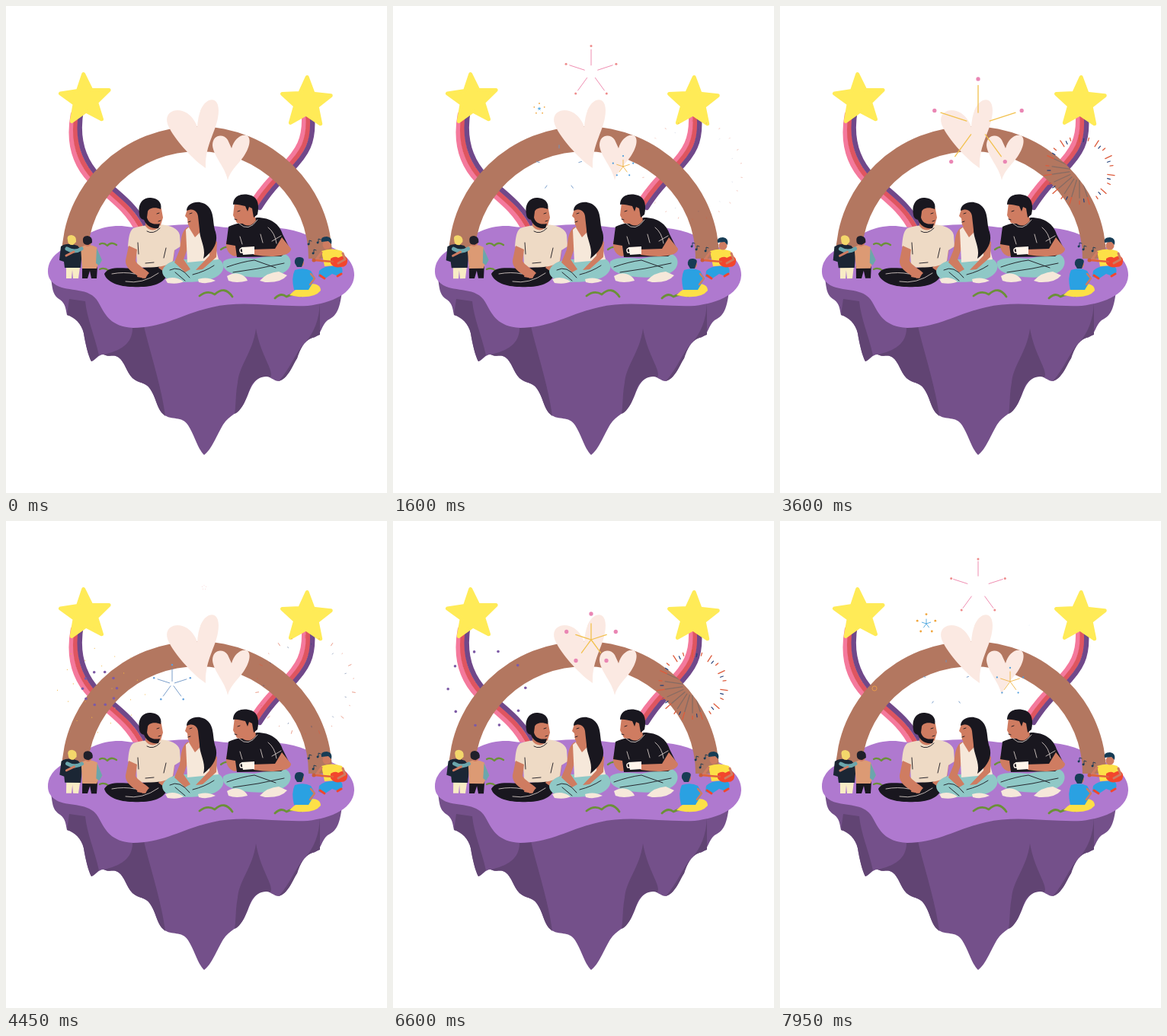
Recreate the animation shown at these times as an HTML page. Size 500 px wide and 640 px high, loop 8 s.

```html
<!DOCTYPE html>
<html lang="en">
<head>
<meta charset="utf-8">
<title>Floating island</title>
<style>
html, body { margin: 0; width: 100%; height: 100%; overflow: hidden; background: #fff; }
svg { display: block; width: 100vw; height: 100vh; }
</style>
</head>
<body>
<svg id="stage" viewBox="0 0 500 640" xmlns="http://www.w3.org/2000/svg"></svg>
<script>
const LOOP = 8000, STEP = 50;
const C = {
  lilac: '#af79cf', body: '#74508a', shade: '#614473', arch: '#b37760', blush: '#fbe9e2',
  star: '#ffeb57', skin: '#cf7c61', black: '#19171f', cream: '#eedac5', pale: '#f6e8da',
  teal: '#8fc8c6', green: '#6b9038', navy: '#173c55', blue: '#2aa1e2', yellow: '#fde047', red: '#f2462d'
};

const fill = (d, color) => `<path d="${d}" fill="${color}"/>`;
const line = (d, color, w = 1) =>
  `<path d="${d}" fill="none" stroke="${color}" stroke-width="${w}" stroke-linecap="round" stroke-linejoin="round"/>`;
const dot = (x, y, r, color) =>
  `<circle cx="${x.toFixed(1)}" cy="${y.toFixed(1)}" r="${r.toFixed(2)}" fill="${color}"/>`;
const group = (inner, attrs = '') => `<g ${attrs}>${inner}</g>`;
const clamp = v => Math.max(0, Math.min(1, v));
const mod = (a, n) => ((a % n) + n) % n;

const ARCH = 'M73 330A177.500 173 0 0 1 428 332L397 332A144.500 139.500 0 0 0 107 330Z';

function tube(d, dy) {
  return ['#f4799c', '#df5560', '#70488a']
    .map((c, i) => group(line(d, c, 6.4), `transform="translate(${i * 5.5} ${i * dy})"`)).join('');
}

function tubes() {
  return tube('M88 142C82 174 87 205 111 230C138 254 160 268 174 298', -3) +
    tube('M391 142C393 174 384 190 362 212C345 229 334 241 322 260', 2.5);
}

function star(cx, cy, tilt) {
  const points = Array.from({ length: 10 }, (_, i) => {
    const a = (i * 36 - 90 + tilt) * Math.PI / 180, r = i % 2 ? 15 : 33.5;
    return `${(cx + Math.cos(a) * r).toFixed(1)},${(cy + Math.sin(a) * r).toFixed(1)}`;
  });
  return `<polygon points="${points.join(' ')}" fill="${C.star}" stroke="${C.star}" stroke-width="5" stroke-linejoin="round"/>`;
}

function island() {
  return fill('M59 358C61 371 61 378 68 384C78 390 78 396 80 406C90 409 99 417 102 430C104 443 108 460 112 467C118 465 121 458 128 458C137 462 141 457 148 462C156 468 158 481 166 489C174 496 183 494 189 503C197 514 198 530 207 537C217 545 231 538 239 551C248 565 251 581 260 590C270 583 277 563 285 550C293 537 305 536 312 523C319 510 321 496 332 489C344 481 349 493 358 493C370 490 375 473 382 463C386 451 391 440 402 436C414 435 413 420 422 413C437 406 438 393 441 376Z', C.body) +
    fill('M83 385L104 388C106 410 116 432 122 459C118 462 116 466 112 467C108 460 104 443 102 430C99 417 90 409 80 406Z', C.shade) +
    fill('M166 421L181 421C189 455 204 500 209 539L207 537C198 530 197 514 189 503C183 494 174 496 166 489C158 481 156 468 148 462C141 457 137 462 128 458C150 453 167 444 166 421Z', C.shade) +
    fill('M328 424C324 455 306 472 304 495C301 510 302 524 300 536C311 532 317 510 322 498C329 488 340 485 347 488C352 478 335 462 328 424Z', C.shade) +
    fill('M412 390C411 413 404 430 392 443C380 455 374 475 358 493C371 489 376 472 382 463C386 451 391 440 402 436L412 432Z', C.shade) +
    fill('M55 349C55 328 75 318 93 311C105 299 125 288 152 289C180 294 210 287 246 287C278 289 298 294 335 292C366 288 397 299 421 314C445 324 457 337 457 354C456 378 428 390 396 394C355 396 310 386 270 396C236 403 207 423 167 423C137 421 131 407 121 389C110 369 82 376 66 367C58 362 55 356 55 349Z', C.lilac) +
    line('M123 313Q128 310 133 315Q138 309 145 314M282 320Q290 314 296 319Q302 314 308 317M123 346Q129 343 135 348', C.green, 2.2) +
    line('M254 381Q264 373 274 379Q287 367 297 382M353 384Q361 376 368 382Q376 377 387 381', C.green, 2.8);
}

function hearts() {
  return fill('M262 213C246 203 218 172 212 155C207 139 224 132 238 141C245 146 249 153 251 159C252 145 255 130 266 124C277 120 281 131 278 147C275 166 261 184 262 213Z', C.blush) +
    fill('M291 229C288 212 272 197 271 183C271 169 285 167 291 176L296 187C299 176 307 168 316 170C323 174 319 188 311 199C302 211 294 217 291 229Z', C.blush);
}

function leftMan() {
  return fill('M129 352C134 342 150 344 167 345L207 341L213 350C207 367 190 370 166 369C149 369 132 363 129 352Z', C.black) +
    fill('M222 318L219 337L207 349L200 344L211 330L213 315Z', C.skin) +
    fill('M167 292C178 288 188 288 200 287C216 288 226 292 228 301L229 316L221 321L219 335C211 345 182 344 172 343L171 321L160 316C161 304 162 296 167 292Z', C.cream) +
    fill('M161 315L172 320L170 335C173 341 182 345 188 351L180 358C167 352 156 344 157 334Z', C.skin) +
    fill('M183 279L200 284L201 290C195 297 187 295 183 289Z', C.skin) +
    fill('M178 268C180 259 203 259 204 267L206 278L203 288C197 293 188 291 182 283Z', C.skin) +
    fill('M175 274C172 259 181 251 190 252C201 253 205 260 203 267C196 264 188 265 186 270L185 278C187 285 193 288 202 286L200 292C191 294 183 287 181 281C177 280 175 277 175 274Z', C.black) +
    line('M198 273L201 272M200 283L203 282M173 311L174 326M210 318L207 331M183 338L194 337M185 296Q193 301 202 292', C.black, .9) +
    line('M139 352Q155 349 169 352M157 362Q179 366 200 351', '#e8dcd6', .8) +
    fill('M174 347L187 351L183 358L172 356Z', C.skin);
}

function woman() {
  return fill('M205 348C210 335 225 333 239 333L276 331C286 335 288 344 282 351C272 362 252 363 231 363C214 362 205 357 205 348Z', C.teal) +
    fill('M209 359Q221 354 233 362Q226 366 212 364ZM252 359Q264 355 275 361Q264 366 253 363Z', C.pale) +
    fill('M239 290C229 296 230 309 228 320L221 337L235 350L242 346L233 333L241 310Z', C.skin) +
    fill('M236 294L242 289L257 294L272 306L279 333L238 337Z', C.pale) +
    fill('M268 305L277 310L276 330L258 346L249 347L267 328Z', C.skin) +
    fill('M242 282L254 280L257 295L248 304L240 291Z', C.skin) +
    fill('M239 264L235 276L238 279L239 288C244 292 252 288 254 278L252 264Z', C.skin) +
    fill('M237 269C237 259 251 255 261 260C275 269 270 283 275 297C279 311 272 322 259 332C263 317 254 307 254 294L252 276C251 269 245 265 237 269Z', C.black) +
    line('M241 273L244 272M239 284L242 283M215 347Q228 340 241 357M245 353Q261 349 273 341M222 350L235 361', C.black, .9);
}

function rightMan() {
  return fill('M285 336C292 329 310 331 326 332L363 325C375 328 376 339 370 346C361 356 337 359 311 355C294 352 283 347 285 336Z', C.teal) +
    fill('M290 355C302 347 315 354 317 361Q302 365 292 361ZM333 361Q343 350 358 349L369 354Q361 364 340 363Z', C.pale) +
    fill('M289 309L301 313L302 321L312 318L313 325L300 329C291 326 288 318 289 309Z', C.skin) +
    fill('M292 290C303 285 317 284 329 278C348 278 359 287 363 300L373 320L361 329L303 330L301 315L289 313Z', C.black) +
    fill('M362 304L374 319C374 329 351 331 325 327L323 320L353 319Z', C.skin) +
    fill('M308 277L326 273L328 282Q319 294 308 284Z', C.skin) +
    fill('M300 258L298 275L303 285C311 288 322 284 328 275L326 257Z', C.skin) +
    fill('M298 261C298 250 308 246 318 248C330 250 333 260 330 274L325 278L323 266L319 264L317 270L314 263C308 262 303 260 298 261Z', C.black) +
    line('M304 270L307 269M300 280L303 281M290 343Q310 336 326 334L354 344M298 350L331 345L365 338', C.black, .9) +
    line('M306 286Q318 298 330 281M344 291Q353 298 355 312M307 303L310 313M334 300L337 311M349 309L361 302', '#eadfd8', .8) +
    fill('M309 317L326 316L326 326L311 327Z', '#fff5eb') + line('M310 318Q305 319 308 324L312 324', '#fff5eb', 1.5);
}

function couple() {
  return fill('M79 343L97 343L95 358L88 358L87 347L86 358L79 358Z', '#f8ecc5') +
    fill('M100 342L120 342L119 358L112 358L110 348L107 358L100 358Z', C.black) +
    fill('M72 316Q80 310 94 315L100 322L98 344L77 344L76 336L70 334Z', '#1b2634') +
    fill('M98 317Q108 311 119 317L126 335L121 339L119 345L100 345Z', '#dc9a74') +
    fill('M119 318L126 334L122 341L118 338Z', '#6ba6ac') +
    line('M80 319Q90 325 99 319', '#6ba6ac', 5) + line('M79 328L89 323', C.skin, 3) +
    dot(86, 309, 5, C.skin) + dot(107, 311, 5, C.skin) +
    fill('M81 308Q79 301 86 301Q93 302 92 310L88 314Q81 314 81 308Z', '#f3d76b') +
    fill('M101 309Q100 302 107 302Q114 303 113 311L108 314Q101 314 101 309Z', '#20202a');
}

function guitarist(lean) {
  const body = fill('M414 322Q428 317 441 322L445 340L418 342Z', C.yellow) +
    line('M414 324L408 332L415 335', C.skin, 3) +
    fill('M426 332Q432 328 436 331Q445 325 448 333Q449 343 439 343Q430 345 426 338Z', C.red) +
    line('M429 336L404 334', '#e0623d', 2.5) + dot(404, 334, 2.5, '#c95d39') +
    line('M442 325L445 333L436 338', C.skin, 3);
  const head = dot(421, 314, 5.5, C.skin) +
    fill('M414 310Q412 303 421 303Q429 304 427 313L423 309Z', C.navy);
  return fill('M411 348Q420 339 440 343Q445 350 436 355L428 352L419 358L410 356Z', C.blue) +
    line('M412 354L418 358M435 355L440 352', C.red, 3) +
    group(body, `transform="translate(${lean * 2} 0)"`) +
    group(head, `transform="translate(${lean * 12} ${lean})"`);
}

function friend(lean) {
  return fill('M372 380Q383 368 400 365Q413 365 413 374Q405 384 383 382Z', C.yellow) +
    group(fill('M379 347Q391 343 400 348L406 358L397 373L378 373Q374 357 379 347Z', C.blue) +
      line('M400 352L405 358L399 366', C.skin, 2.5), `transform="translate(${lean * 3} 0)"`) +
    group(dot(386, 338, 5, C.skin) + fill('M379 338Q378 329 386 330Q393 331 390 337L388 343L382 343Z', C.navy),
      `transform="translate(${lean * 8} ${lean * 2})"`);
}

function notes(t, lean) {
  const bob = Math.round(Math.sin(t / 160) * 1.5);
  const spots = lean ? [[392, 315], [398, 321], [410, 321]] : [[397, 313], [403, 325], [409, 311]];
  return spots.map(([x, y], i) => {
    const h = y + (i % 2 ? bob : -bob);
    return dot(x, h, 1.4, C.navy) + line(`M${x + 1} ${h}V${h - 5}L${x + 4} ${h - 4}`, C.navy, .9);
  }).join('');
}

function spoke(cx, cy, angle, from, to, color, w) {
  const x = Math.cos(angle), y = Math.sin(angle);
  return line(`M${(cx + x * from).toFixed(1)} ${(cy + y * from).toFixed(1)}L${(cx + x * to).toFixed(1)} ${(cy + y * to).toFixed(1)}`, color, w);
}

// Five-pointed sparks: centre, first start, reach, ray colour, tip colour
const SPARKS = [
  [260, 156, 100, 66, '#f2c14e', '#ea86b4'],
  [260, 87, 1250, 38, '#ee7fa8', '#ee8c8c'],
  [327, 137, 1625, 38, '#e97da2', '#4a9bdc'],
  [192, 135, 1500, 35, '#4fa8df', '#f0a53c'],
  [302, 211, 1400, 27, '#f0b445', '#4a9bdc'],
  [218, 214, 1000, 31, '#6b93c4', '#5f9fdc']
];
const SPARK_PERIOD = 3150;

function spark(t, [cx, cy, start, reach, ray, tip]) {
  const p = mod(t - start, SPARK_PERIOD);
  if (p > 800) return '';
  const front = q => reach * Math.sin(clamp(q / 450) * Math.PI / 2) ** 1.5;
  const head = front(p), outer = front(p - 60), inner = front(p - 230) * .93;
  const size = Math.min(head / 8, reach / 25) * (1 - clamp((p - 400) / 280));
  const w = reach > 50 ? 1.3 : .9;
  let out = '';
  for (let i = 0; i < 5; i++) {
    const a = -Math.PI / 2 + i * Math.PI * 2 / 5;
    if (outer > inner) out += spoke(cx, cy, a, inner, outer, ray, w);
    if (size > 0) out += dot(cx + Math.cos(a) * head, cy + Math.sin(a) * head, size, tip);
  }
  return out;
}

// Orange sprinkle followed by a violet ring
function sprinkle(t) {
  const p = mod(t + 20, 1980), cx = 123, cy = 220;
  let out = '';
  if (p > 25 && p < 150) {
    out += `<circle cx="${cx + 1}" cy="${cy}" r="${(p / 16).toFixed(1)}" fill="none" stroke="#e89a4a" stroke-width="1"/>`;
  }
  if (p >= 120 && p < 600) {
    const grow = 1 - (1 - clamp((p - 80) / 380)) ** 2;
    const size = 1.1 * (1 - clamp((p - 430) / 170));
    for (let i = 0; i < 22; i++) {
      const a = i * 2.4, r = (16 + 44 * Math.sqrt(i / 21)) * grow;
      out += dot(cx + Math.cos(a) * r, cy + Math.sin(a) * r, size, '#f3b63f');
    }
  }
  if (p > 460 && p < 980) {
    const r = 64 * Math.sin(clamp((p - 400) / 480) * Math.PI / 2);
    const size = 1.8 * (1 - clamp((p - 680) / 300));
    for (let i = 0; i < 10; i++) {
      const a = (i + .5) * Math.PI / 5 + .3;
      out += dot(cx + Math.cos(a) * r, cy + Math.sin(a) * r, size, '#7d5aa6');
    }
  }
  return out;
}

function bigBurst(t) {
  const p = mod(t, 3000) - 200;
  if (p < 0 || p > 1500) return '';
  const cx = 393, cy = 216, r = 66 * (1 - (1 - clamp(p / 1200)) ** 3);
  const left = 1 - clamp((p - 800) / 700);
  const inside = p < 520 ? '#776865' : '#f1cbb8';
  const count = 22;
  let rays = '', out = '';
  for (let i = 0; i < count; i++) {
    const a = (i + .5) * Math.PI * 2 / count;
    const long = (i % 2 ? 7 : 11) * clamp(r / 55);
    out += spoke(cx, cy, a, r - long * left, r - (i % 2 ? 2 : 0), '#dd5b3c', 1.1 * left + .2);
    if (i % 2 === 0) out += spoke(cx, cy, a + .14, r * .82, r * .82 + 4 * left, '#24417a', 1.2 * left);
    if (p < 950) rays += spoke(cx, cy, a, r * clamp(p / 1400), r * .78, inside, 1.3);
  }
  return group(rays, 'clip-path="url(#archClip)" opacity=".75"') + out;
}

const stage = document.getElementById('stage');
stage.innerHTML = `<clipPath id="archClip"><path d="${ARCH}"/></clipPath>` +
  tubes() + island() + fill(ARCH, C.arch) + hearts() +
  star(104, 123, -4) + star(394, 127, 2) +
  leftMan() + woman() + rightMan() +
  group('', 'id="couple"') + group('', 'id="band"') + group('', 'id="sparks"');

const [pair, band, sparks] = ['couple', 'band', 'sparks'].map(id => document.getElementById(id));
pair.innerHTML = couple();

function draw(t) {
  const lean = mod(t, 2000) < 720 ? 0 : 1;
  pair.setAttribute('transform', `rotate(${(Math.sin(t / 2000 * Math.PI * 2) * .8).toFixed(2)} 98 358)`);
  band.innerHTML = notes(t, lean) + guitarist(lean) + friend(lean);
  sparks.innerHTML = sprinkle(t) + bigBurst(t) + SPARKS.map(s => spark(t, s)).join('');
}

const begin = performance.now();
let last = -1;
function tick() {
  const t = Math.floor(mod(performance.now() - begin, LOOP) / STEP) * STEP;
  const shown = t < 100 ? 0 : t;
  if (shown !== last) draw(last = shown);
  requestAnimationFrame(tick);
}
tick();
</script>
</body>
</html>
```
